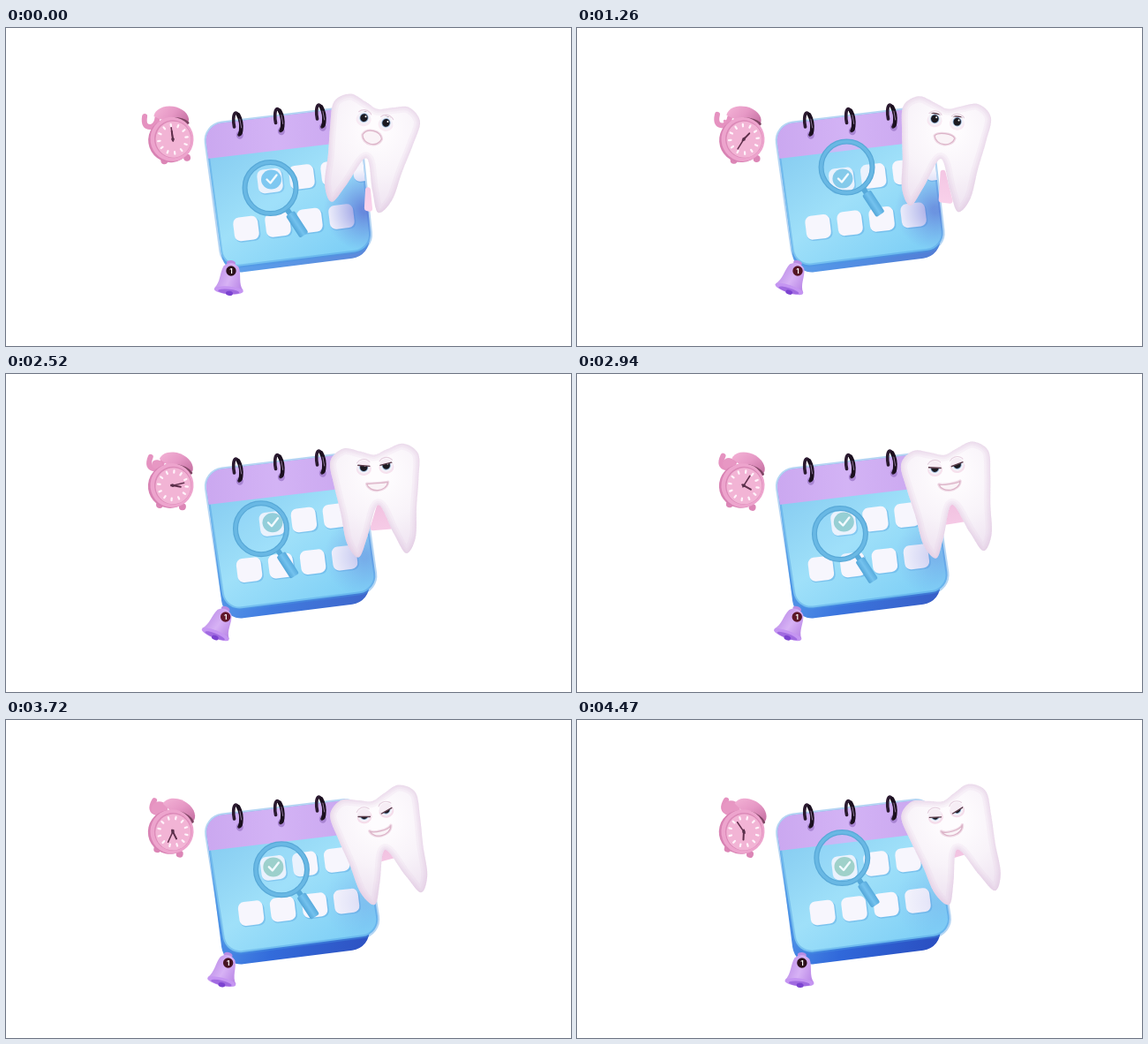
An HTML page with a canvas for the animation above (4.5 s loop, 640 px wide and 360 px high).

```html
<!DOCTYPE html>
<html lang="en">
<head>
<meta charset="utf-8">
<title>Dental appointment</title>
<style>
html, body { margin: 0; width: 100%; height: 100%; overflow: hidden; background: #fff; }
canvas { display: block; width: 640px; height: 360px; }
</style>
</head>
<body>
<canvas id="stage" width="640" height="360"></canvas>
<script>
const ctx = document.getElementById('stage').getContext('2d');
const LOOP = 4500, STEP = 30, TAU = Math.PI * 2;

const mix = (a, b, k) => a + (b - a) * k;
const rgb = (a, b, k) => `rgb(${a.map((v, i) => Math.round(mix(v, b[i], k))).join()})`;

function gradient(x0, y0, x1, y1, ...colors) {
  const g = ctx.createLinearGradient(x0, y0, x1, y1);
  colors.forEach((c, i) => g.addColorStop(i / (colors.length - 1), c));
  return g;
}

function glow(x, y, r0, r1, ...colors) {
  const g = ctx.createRadialGradient(x, y, r0, x, y, r1);
  colors.forEach((c, i) => g.addColorStop(i / (colors.length - 1), c));
  return g;
}

function at(x, y, degrees, draw) {
  ctx.save();
  ctx.translate(x, y);
  ctx.rotate(degrees * Math.PI / 180);
  draw();
  ctx.restore();
}

function fill(style) {
  ctx.fillStyle = style;
  ctx.fill();
}

function stroke(color, width, cap = 'round') {
  ctx.strokeStyle = color;
  ctx.lineWidth = width;
  ctx.lineCap = cap;
  ctx.lineJoin = 'round';
  ctx.stroke();
}

function oval(x, y, rx, ry, style) {
  ctx.beginPath();
  ctx.ellipse(x, y, rx, ry, 0, 0, TAU);
  fill(style);
}

function path(...points) {
  ctx.beginPath();
  points.forEach(([x, y]) => ctx.lineTo(x, y));
}

function roundPoly(r, ...pts) {
  const n = pts.length, [a, z] = [pts[0], pts[n - 1]];
  ctx.beginPath();
  ctx.moveTo((a[0] + z[0]) / 2, (a[1] + z[1]) / 2);
  pts.forEach((q, i) => ctx.arcTo(...q, ...pts[(i + 1) % n], r));
  ctx.closePath();
}

function smoothLoop(pts) {
  const n = pts.length, pt = i => pts[(i + n) % n];
  ctx.beginPath();
  ctx.moveTo(...pts[0]);
  for (let i = 0; i < n; i++) {
    const [a, b, c, d] = [i - 1, i, i + 1, i + 2].map(pt);
    ctx.bezierCurveTo(b[0] + (c[0] - a[0]) / 6, b[1] + (c[1] - a[1]) / 6,
      c[0] - (d[0] - b[0]) / 6, c[1] - (d[1] - b[1]) / 6, ...c);
  }
  ctx.closePath();
}

function drawRing(x, y) {
  at(x, y, -8, () => {
    oval(1, 13, 4, 4.5, '#a884d2');
    ctx.beginPath();
    ctx.ellipse(0, 0, 4, 12.5, 0, 2.9, TAU + 1.5);
    stroke('#2b1a30', 3.6);
    ctx.beginPath();
    ctx.ellipse(0, 0, 4, 12.5, 0, -0.9, 1.1);
    stroke('#1c1020', 4.6);
    path([3.6, -5], [4, 5]);
    stroke('#8a7294', 1);
  });
}

function drawCalendar(p) {
  roundPoly(22, [225, 111], [395, 94], [414, 258], [247, 279]);
  fill(gradient(226, 180, 410, 255, rgb([112,176,238], [96,166,238], p),
    rgb([90,154,232], [48,104,218], p), rgb([92,136,218], [42,78,192], p)));

  ctx.save();
  roundPoly(20, [224, 110], [mix(398, 400, p), 89],
    [mix(415, 425, p), mix(251, 242, p)], [mix(246, 249, p), mix(272, 265, p)]);
  fill(gradient(240, 130, 350, 275, '#86ccf1', '#9fe0f9', '#80d0f6'));
  stroke('rgba(70,150,226,.4)', 4);
  ctx.clip();
  path([220, 80], [430, 80], [430, 124], [220, 149]);
  fill(gradient(228, 115, 385, 110, '#cba8f0', '#d3b3f5', '#cba8f0'));

  for (let row = 0; row < 2; row++) for (let i = 0; i < 4; i++) {
    const x = 299 - 27 * row + 36 * i + p * (4 + 2 * row);
    const y = 173 + 54 * row - 4.5 * i - p * (6 + 3 * row);
    at(x, y, -7, () => {
      ctx.beginPath();
      ctx.roundRect(-13.5, -12, 29, 27, 7);
      fill('rgba(90,165,224,.45)');
      ctx.beginPath();
      ctx.roundRect(-14, -13.5, 28, 27, 7);
      fill('#f7f6fd');
    });
  }
  // Shadow cast by the tooth.
  ctx.fillStyle = glow(406, 206, 4, 46, `rgba(84,92,205,${mix(0.62, 0.12, p)})`, 'rgba(100,120,220,0)');
  ctx.fillRect(350, 150, 80, 110);
  ctx.restore();

  at(mix(300.5, 303, p), mix(171.5, 166, p), 0, () => {
    oval(0, 0, 11.5, 11, rgb([120,196,238], [158,207,192], p));
    path([-5, 0], [-1, 4], [6, -5]);
    stroke('#fff', 2.4);
  });
  for (let i = 0; i < 3; i++) drawRing(262 + 47 * i, 108.5 - 4.5 * i);
}

function drawMagnifier(t) {
  const a = TAU * t / 3000;
  at(299.5 + 12.5 * Math.sin(a), 168.5 + 12.5 * Math.cos(a), 0, () => {
    oval(0, 0, 28, 28, 'rgba(160,222,250,.15)');
    path([18, 23], [24, 32]);
    stroke('#56a9da', 6);
    at(22, 29, -33, () => {
      ctx.beginPath();
      ctx.roundRect(-5.5, 0, 11.5, 29.5, 2);
      fill(gradient(-5.5, 0, 6, 0, '#52a5d8', '#74c2ee', '#58abdd'));
    });
    ctx.beginPath();
    ctx.arc(0, 0, 29, 0, TAU);
    stroke('#58a9d8', 6);
    stroke('#69b8e4', 3.5);
  });
}

function drawEye(x, open, side) {
  at(x, 0, 0, () => {
    oval(0, 2, 8.5, 7.5, `rgba(236,188,214,${mix(0.5, 0.25, open)})`);
    ctx.save();
    ctx.beginPath();
    ctx.arc(0, 0, 7.5, 0, TAU);
    ctx.clip();
    oval(0, 0, 7.5, 7.5, '#f3f1f8');
    oval(0, 0, 5, 5.2, '#86a8cc');
    oval(0, 0, 4.2, 4.4, '#1b1920');
    oval(1.6, -1.8, 1, 1, '#fff');
    const y = mix(2.5, -8, open), tilt = 2 * side * (1 - open);
    path([-9, -10], [9, -10], [9, y - tilt], [-9, y + tilt]);
    fill('#f6edf5');
    path([-7, y + tilt], [7, y - tilt]);
    stroke('#5b3c4b', 1.4);
    ctx.restore();
    ctx.beginPath();
    ctx.arc(0, 0, 9, -2.5, -0.65);
    stroke('rgba(214,180,204,.6)', 1.1);
  });
}

function drawMouth(smile) {
  const w = mix(11, 12.5, smile), top = mix(-10, 4, smile), bottom = 10;
  ctx.beginPath();
  ctx.moveTo(-w, -1);
  ctx.bezierCurveTo(-w * 0.7, top, w * 0.7, top, w, -1);
  ctx.bezierCurveTo(w * 0.8, bottom, -w * 0.8, bottom, -w, -1);
  ctx.closePath();
  stroke('#f0dbe7', 3.5);
  fill('#faf3f7');
  stroke('#dcb4c8', 1.2);
}

function drawTooth(p) {
  const half = [[15, -18], [34, -23], [50, -10], [48, 18], [43, 50], [39, 84], [27, 101], [15, 78]];
  const mirrored = half.map(([x, y]) => [-x, y]).reverse();
  at(418, 104.5, 13 - 30 * p, () => {
    // The back root retreats behind the crown as the tooth turns.
    const end = 102 - 50 * p;
    roundPoly(3, [0, 40], [21, end], [11 - 40 * p, end]);
    fill(gradient(0, 44, 0, 102, '#f2c2e1', '#fad4ec'));

    ctx.save();
    smoothLoop([[0, -13], ...half, [0, 44], ...mirrored]);
    fill(glow(4, 10, 12, 92, '#fefcfe', '#f8f3f9', '#eee2f0'));
    ctx.clip();
    [14, 9, 5, 2].forEach(w => stroke('rgba(216,184,216,.13)', w));
    ctx.restore();

    const open = Math.max(0.05, 1 - p);
    drawEye(-12.8, open, -1);
    drawEye(12.8, open, 1);
    at(1, 20, 0, () => drawMouth(p ** 0.75));
  });
}

function drawClock(u, p) {
  at(187, 126, -8 + 22 * p, () => {
    [-11, 15].forEach(x => oval(x, 23, 4, 4, '#dc86b6'));
    ctx.beginPath();
    ctx.moveTo(-26, -30);
    ctx.quadraticCurveTo(-30, -17, -20, -17);
    ctx.quadraticCurveTo(-14, -18, -12, -26);
    stroke('#e592c0', 6);
    oval(-18, -22, 10 * p, 9 * p, '#e797c3');
    oval(-1, 1, 25, 25, '#d882b3');
    at(4, -25, 16, () => {
      ctx.beginPath();
      ctx.ellipse(0, 2, 20, 14, 0, Math.PI, TAU);
      ctx.quadraticCurveTo(0, 9, -20, 2);
      fill(gradient(-16, -12, 16, 6, '#f2b0d4', '#e698c5', '#c874a5'));
      ctx.beginPath();
      ctx.moveTo(1, 2);
      ctx.quadraticCurveTo(12, 0, 19, 4);
      stroke('#7d4463', 3.5);
    });
    at(2, 0, 0, () => {
      oval(-1, 0, 24.5, 25, '#eda4cd');
      oval(0, 0, 21, 21.5, '#dc8ab8');
      oval(0.5, 0.5, 20, 20.5, '#f2b4d5');
      for (let i = 0; i < 12; i++) at(0, 0, i * 30, () => {
        path([0, -14.5], [0, -17]);
        stroke('#fff3fa', 2.2);
      });
      const hand = (degrees, length, width) => at(0, 0, degrees, () => {
        path([0, 2], [0, -length]);
        stroke('#5f2f4b', width);
      });
      hand(170 * u, 9, 2);
      hand(360 * 20 * u, 13, 1.5);
      oval(0, 0, 1.8, 1.8, '#58304a');
    });
  });
}

function drawBell(u) {
  const swing = Math.sin(Math.PI * u), x = 255 - 6.5 * swing;
  at(x, 266, 5 + 17 * swing, () => {
    oval(0, 0, 5, 3, '#b88ce4');
    ctx.beginPath();
    ctx.moveTo(-8, 4);
    ctx.quadraticCurveTo(0, -4, 9, 4);
    ctx.bezierCurveTo(13, 12, 10, 23, 16.5, 30);
    ctx.quadraticCurveTo(0, 39, -16.5, 30);
    ctx.bezierCurveTo(-10, 23, -12, 12, -8, 4);
    fill(gradient(-14, 10, 15, 18, '#c093ea', '#d7b2f5', '#bd8ce8'));
    oval(0, 31, 16.5, 4.5, '#c595f2');
    oval(0, 32.5, 12, 2.6, '#a06ae0');
    oval(1, 34.5, 4, 2.6, '#7c43d0');
  });
  oval(x, 275, 5.7, 5.7, rgb([42,16,26], [98,24,42], swing));
  ctx.fillStyle = '#fff';
  ctx.font = 'bold 8px Inter, sans-serif';
  ctx.textAlign = 'center';
  ctx.textBaseline = 'middle';
  ctx.fillText('1', x, 275.5);
}

function render(now) {
  const u = Math.floor(now % LOOP / STEP) * STEP / LOOP;
  const p = (1 - Math.cos(Math.PI * u)) / 2;
  ctx.fillStyle = '#fff';
  ctx.fillRect(0, 0, 640, 360);
  drawCalendar(p);
  drawMagnifier(u * LOOP);
  drawTooth(p);
  drawClock(u, p);
  drawBell(u);
}

const start = performance.now();
function tick() {
  render(performance.now() - start);
  requestAnimationFrame(tick);
}
tick();
</script>
</body>
</html>
```
